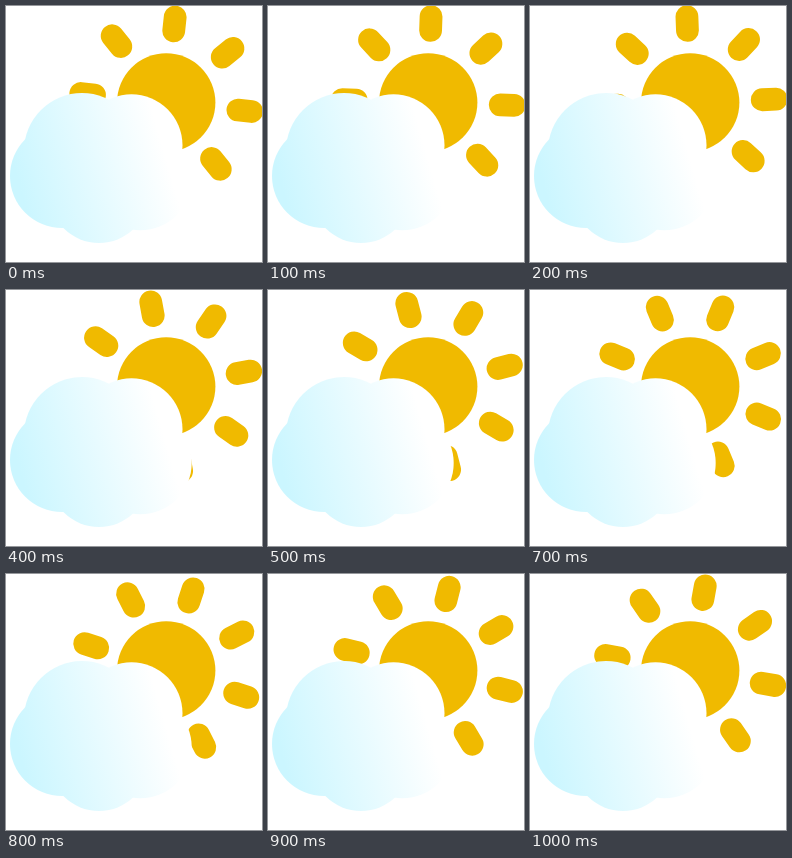
Recreate the animation shown at these times as an HTML page. Size 256 by 256 pixels, loop 1100 ms.

```html
<!DOCTYPE html>
<html lang="en">
<head>
<meta charset="utf-8">
<title>Sun behind a cloud</title>
<style>
  html, body { margin: 0; height: 100%; overflow: hidden; background: #fff; }
  svg { display: block; width: 100vw; height: 100vh; }
</style>
</head>
<body>
<svg viewBox="0 0 256 256">
  <defs>
    <linearGradient id="mist" gradientUnits="userSpaceOnUse" x1="14" y1="182" x2="157" y2="141">
      <stop stop-color="#cbf6ff"/>
      <stop offset="1" stop-color="#fff"/>
    </linearGradient>
    <rect id="ray" x="-11.4" y="-97.3" width="22.8" height="36.6" rx="11.4"/>
  </defs>
  <g fill="#f0ba00" transform="translate(160.2 96.5)">
    <circle r="49.2"/>
    <g id="rays"></g>
  </g>
  <g fill="url(#mist)">
    <circle cx="56" cy="170" r="52"/>
    <circle cx="76" cy="145" r="58"/>
    <circle cx="125.5" cy="139.3" r="51"/>
    <circle cx="134.5" cy="173" r="51.2"/>
    <circle cx="93" cy="187" r="50"/>
  </g>
</svg>
<script>
  const RAYS = 8, STEPS = 11, STEP_MS = 100, START = 6;
  const gap = 360 / RAYS;
  const rays = document.getElementById('rays');

  rays.innerHTML = Array.from({ length: RAYS }, (_, i) =>
    `<use href="#ray" transform="rotate(${i * gap})"/>`).join('');

  // One loop turns the rays back by exactly one gap, in discrete steps.
  function draw() {
    const step = Math.floor(performance.now() / STEP_MS) % STEPS;
    rays.setAttribute('transform', `rotate(${START - gap * step / STEPS})`);
    requestAnimationFrame(draw);
  }
  draw();
</script>
</body>
</html>
```
